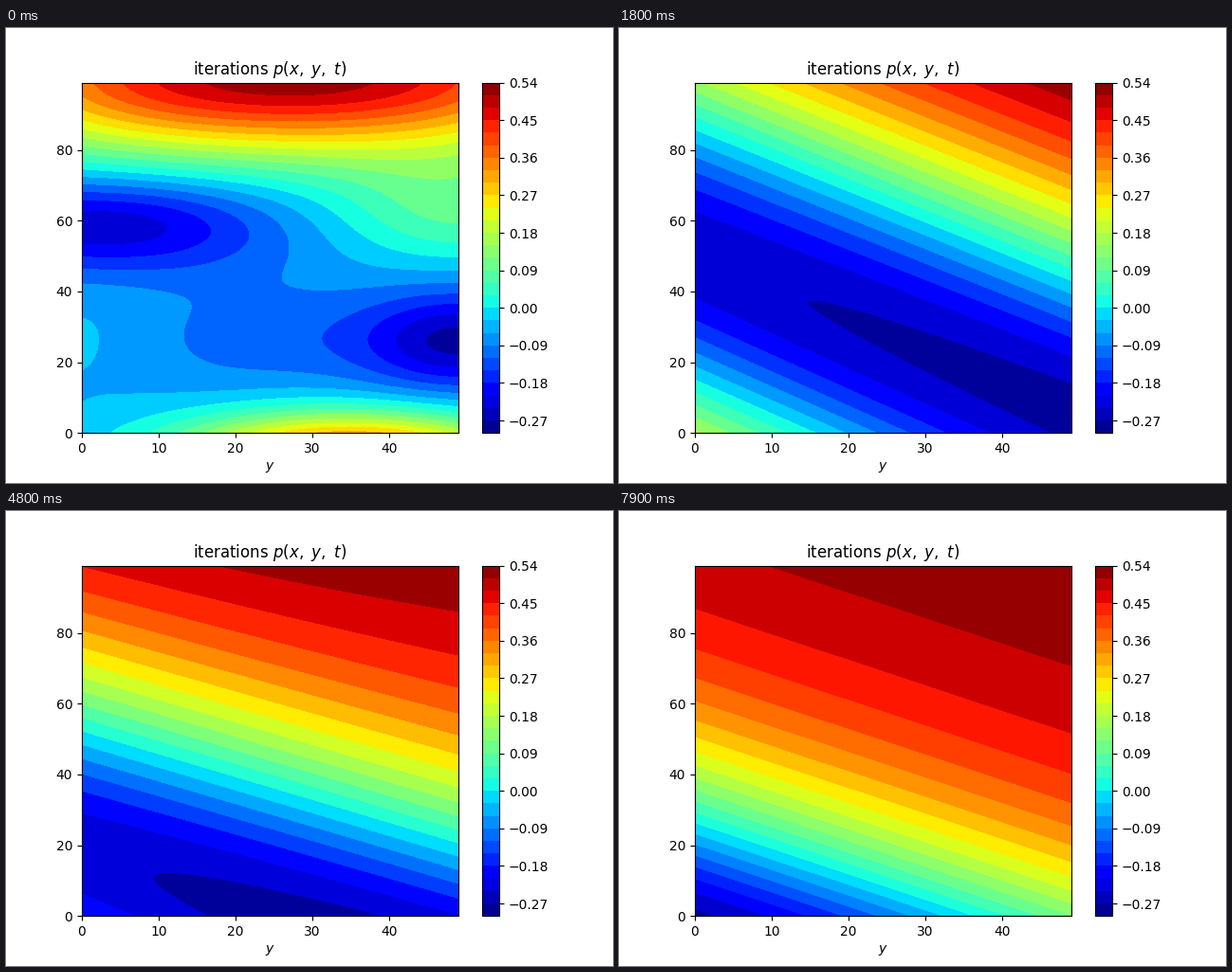
Write a matplotlib script that moves like this. It is 640 px wide and 480 px high and loops after 8000 ms.

```python
import numpy as np
import matplotlib.pyplot as plt
from matplotlib.animation import FuncAnimation

plt.rcParams["text.kerning_factor"] = 6

FRAMES, INTERVAL = 80, 100
SETTLE = 7  # steps until only the travelling valley is left
X, Y = np.meshgrid(np.arange(50.0), np.arange(100.0))


def bump(height, x, y, width, depth):
    return height * np.exp(-((X - x) / width) ** 2 / 2 - ((Y - y) / depth) ** 2 / 2)


def bell(step, centre, spread):
    return np.exp(-((step - centre) / spread) ** 2)


def normalize(field):
    return 0.03 + 0.955 * (field - field.min()) / np.ptp(field)


def start_field():
    """Ridges along the top and bottom edges, pools on the left and right."""
    ridge = 14.4 - 4.2 * ((X - 27) / 27) ** 2
    return normalize(
        ridge * np.exp(-((Y - 101) / 16.3) ** 2 / 2)
        + bump(11.5, 35, -6, 16.5, 8.5)
        + bump(-4.5, 3, 59, 15, 9.5)
        + bump(-4.6, 49, 26, 8.5, 9.6)
        + bump(3.3, 49, 62, 12, 11)
        + bump(0.9, 0, 28, 9, 14)
        + bump(-1.0, 25, 27, 14, 9))


def valley_field(step):
    """Slanted valley that slides down and rises to a plateau on both sides."""
    slant = 0.72 + 0.7 * np.exp(-step / 14)
    centre = 73 - 1.32 * step + 0.0035 * step ** 2
    width = 88 + 27 * bell(step, 22, 30)
    tilt = 0.8 * np.exp(-step / 6.5) - 0.12 * bell(step, 32, 20)
    distance = (Y + slant * X - centre) / width
    return normalize(1 - (1 + distance ** 2) ** -3 + tilt * X / 49)


def pressure(step):
    u = min(step / SETTLE, 1)
    blend = u * u * (3 - 2 * u)
    return normalize((1 - blend) * start_field()
                     + blend * valley_field(max(step, SETTLE - 1)))


def band_count(step):
    return int(round(np.interp(step, [0, 7, 18, 30, 56, 79],
                               [20, 18, 20, 19, 19, 22])))


fig, ax = plt.subplots(figsize=(6.4, 4.8), dpi=100)
scale = np.arange(-10, 19) * 0.03
contours = ax.contourf(-0.3 + 0.84 * pressure(0), levels=scale, cmap="jet")
fig.colorbar(contours, ax=ax)
ax.set_title(r"iterations $p(x,\ y,\ t)$")
ax.set_xlabel("$y$")


def draw(step):
    for old in list(ax.collections):
        old.remove()
    levels = np.linspace(0, 1, band_count(step) + 1)
    ax.contourf(pressure(step), levels=levels, cmap="jet")
    return ax.collections


anim = FuncAnimation(fig, draw, frames=FRAMES, interval=INTERVAL,
                     init_func=lambda: [], repeat=True, repeat_delay=0)
plt.show()
```
